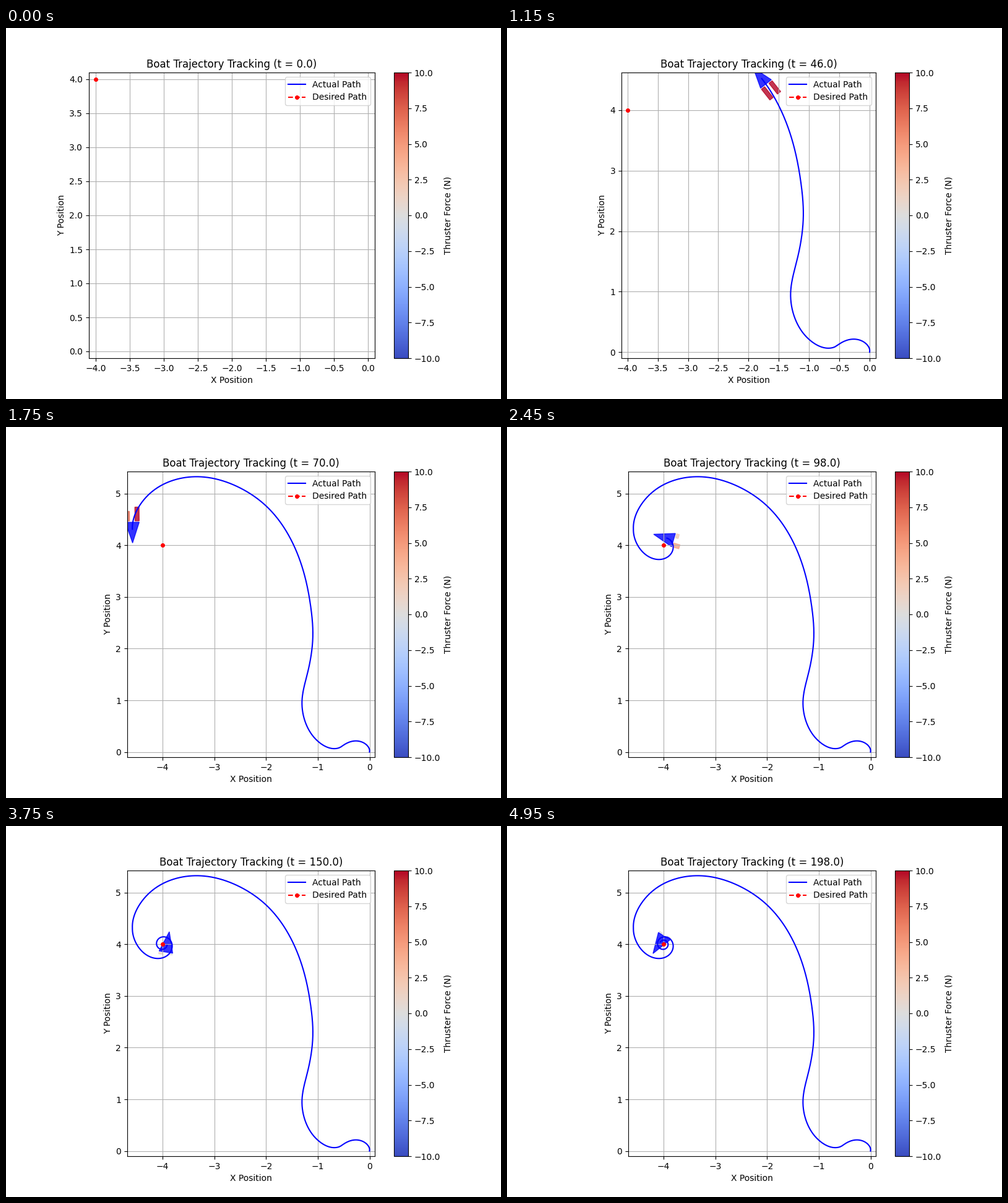
Animation of 800 by 600 pixels, one loop 5 s. Source, as a matplotlib script:

```python
import numpy as np
import matplotlib.pyplot as plt
from matplotlib.animation import FuncAnimation
from matplotlib.cm import ScalarMappable
from matplotlib.colors import Normalize
from matplotlib.patches import Polygon

FRAMES, INTERVAL = 100, 50
T_STEP, SUBSTEPS = 2.0, 20
GOAL = np.array([-4.0, 4.0])
T_CIRCLE = 70           # the boat starts to circle the goal
CRUISE, T_SPEEDUP = .155, 8.8

# Key points of the approach; the boat reaches MARKS at MARK_TIMES
MARKS = [(0, 0), (-1.135, 2.8), (-2.5, 5.107)]
MARK_TIMES = [0, 34, 52, T_CIRCLE]
APPROACH = [
    MARKS[0], (.0015, .03), (-.04, .12), (-.26, .215), (-.5, .135),
    (-.575, .087), (-.65, .067), (-1.0, .21), (-1.2, .48), (-1.305, .98),
    (-1.2, 1.52), (-1.095, 2.27), MARKS[1], (-1.309, 3.6), (-2.0, 4.76),
    MARKS[2], (-3.33, 5.325), (-4.0, 5.17), (-4.335, 4.91),
]


def spline(u, p, q):
    """Natural cubic spline through p(u), evaluated at q."""
    h = np.diff(u)
    slope = np.diff(p) / h
    n = len(u)
    a, b = np.eye(n), np.zeros(n)
    for i in range(1, n - 1):
        a[i, i - 1:i + 2] = h[i - 1], 2 * (h[i - 1] + h[i]), h[i]
        b[i] = 6 * (slope[i] - slope[i - 1])
    m = np.linalg.solve(a, b)
    k = np.clip(np.searchsorted(u, q) - 1, 0, n - 2)
    d = q - u[k]
    return (p[k] + d * (slope[k] - h[k] * (2 * m[k] + m[k + 1]) / 6)
            + d**2 * m[k] / 2 + d**3 * (m[k + 1] - m[k]) / (6 * h[k]))


def spiral(turn):
    """Point of the closing spiral after a turn around the goal."""
    angle = np.radians(152) + turn
    radius = 1 / (1.515 + 1.14 * turn - .014 * turn**2 - .4 * turn * np.exp(-2 * turn))
    return GOAL + radius[:, None] * np.column_stack([np.cos(angle), np.sin(angle)])


def distance(t):
    """Way made by a boat that speeds up to its cruising speed."""
    return CRUISE * (t - T_SPEEDUP * (1 - np.exp(-t / T_SPEEDUP)))


def approach(t):
    pts = np.vstack([APPROACH, spiral(np.array([0, .4]))])
    chord = np.r_[0, np.cumsum(np.hypot(*np.diff(pts, axis=0).T))]
    marks = [chord[APPROACH.index(p)] for p in MARKS] + [chord[-2]]
    s = np.interp(distance(t), distance(np.array(MARK_TIMES)), marks)
    return np.column_stack([spline(chord, p, s) for p in pts.T])


def circling(t):
    t = t - T_CIRCLE
    t = t - 1.5 * (1 - np.exp(-t / 7))
    return spiral(np.radians(431) * np.log1p(t / 30))


def fading_force(start, scale):
    return 10 * np.exp(-np.maximum(0, times - start) / scale)


times = np.arange((FRAMES - 1) * SUBSTEPS + 1) * T_STEP / SUBSTEPS
near = times >= T_CIRCLE
xs, ys = np.vstack([approach(times[~near]), circling(times[near])]).T
headings = np.arctan2(np.gradient(ys), np.gradient(xs))
forces = fading_force(T_CIRCLE, 35), fading_force(62, 22)

fig, ax = plt.subplots(figsize=(8, 6), dpi=100)
ax.set_aspect('equal')
ax.grid(True)
ax.set_xlabel('X Position')
ax.set_ylabel('Y Position')
path, = ax.plot([], [], 'b-', label='Actual Path')
ax.plot(*GOAL[:, None], 'r--o', markersize=4, label='Desired Path')
ax.legend(loc='upper right')

force_map = ScalarMappable(Normalize(-10, 10), 'coolwarm')
fig.colorbar(force_map, ax=ax, label='Thruster Force (N)')

hull = ax.add_patch(Polygon(np.zeros((3, 2)), color='blue', alpha=.8))
thrusters = [ax.add_patch(Polygon(np.zeros((4, 2)), alpha=.8)) for _ in forces]


def to_world(shape, k, size):
    c, s = np.cos(headings[k]), np.sin(headings[k])
    return np.array(shape) * size @ np.array([[c, s], [-s, c]]) + (xs[k], ys[k])


def update(frame):
    k = frame * SUBSTEPS
    x, y = xs[:k + 1], ys[:k + 1]
    path.set_data(x, y)
    ax.set_xlim(min(x.min(), GOAL[0]) - .1, max(x.max(), GOAL[0]) + .1)
    ax.set_ylim(min(y.min(), GOAL[1]) - .1, max(y.max(), GOAL[1]) + .1)
    ax.set_title(f'Boat Trajectory Tracking (t = {times[k]:.1f})')

    # The boat grows with the extent of the path travelled so far
    size = .05 * max(np.ptp(x), np.ptp(y))
    hull.set_xy(to_world([(1, 0), (-.5, .5), (-.5, -.5)], k, size))
    hull.set_visible(size > 0)
    for patch, force, side in zip(thrusters, forces, (.35, -.35)):
        back = -.6 - force[k] / 10
        lo, hi = side - .15, side + .15
        patch.set_xy(to_world([(-.6, lo), (-.6, hi), (back, hi), (back, lo)], k, size))
        patch.set_color(force_map.to_rgba(force[k])[:3])
        patch.set_visible(size > 0)
    return path, hull, *thrusters


anim = FuncAnimation(fig, update, frames=FRAMES, interval=INTERVAL,
                     init_func=lambda: update(0), repeat=True, repeat_delay=0)
plt.show()
```
